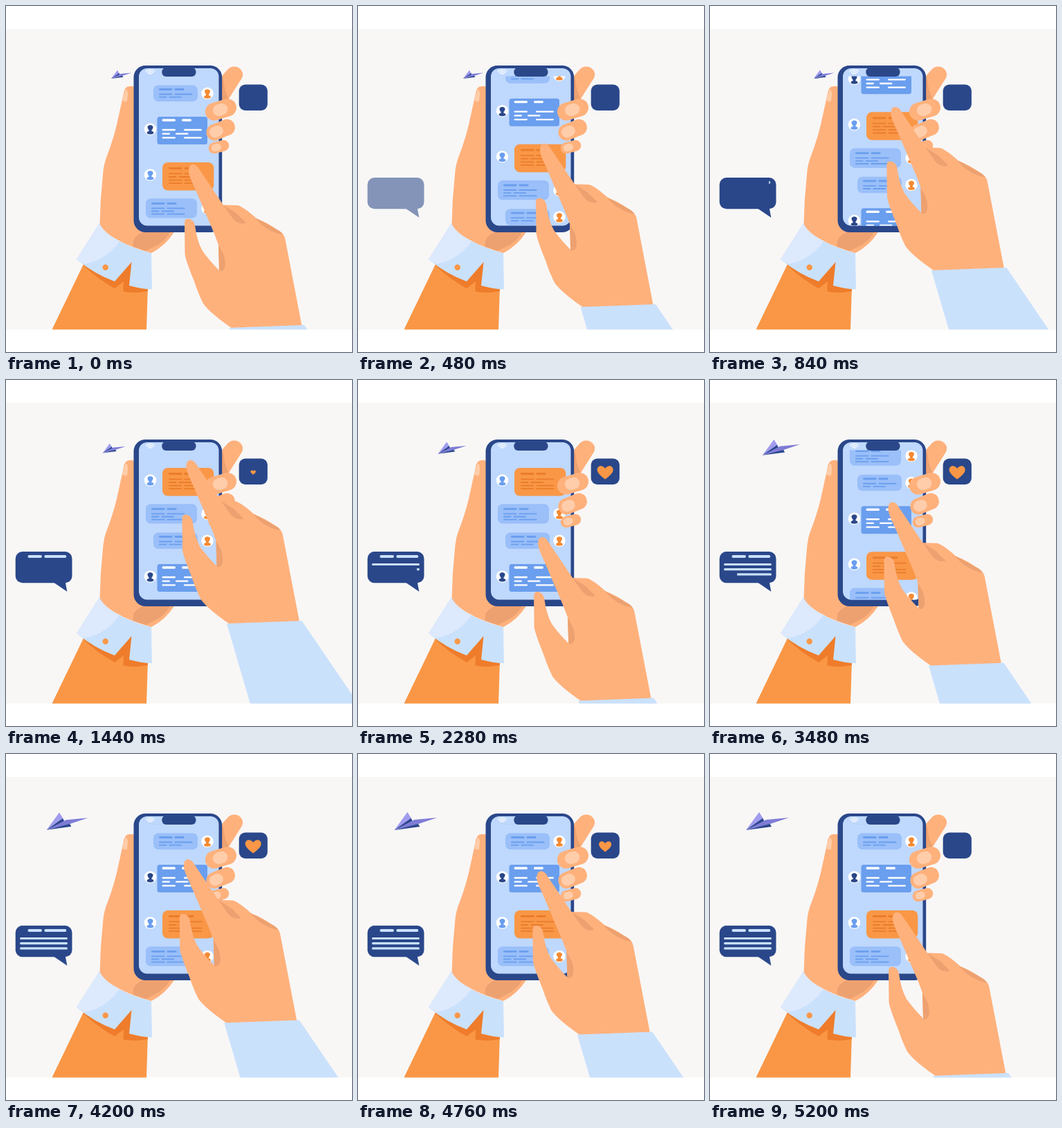
An HTML page that plays this animation: 500x500 px, repeating every 5.4 s.

```html
<!DOCTYPE html>
<html lang="en">
<head>
<meta charset="utf-8">
<title>Chatting on a phone</title>
<style>
  html, body { margin: 0; width: 100%; height: 100%; overflow: hidden; background: #fff; }
  svg { display: block; width: 100vw; height: 100vh; }
  .skin { fill: #ffb17c; }
  .shade { fill: #eda170; }
  .nail { fill: #ffcdaa; }
  .navy { fill: #2a478a; }
  .cuff { fill: #cae1fc; }
  .orange { fill: #f99746; }
  .rust { fill: #ee7c2b; }
  .line { fill: none; stroke-linecap: round; }
</style>
</head>
<body>
<svg viewBox="0 0 500 500" xmlns="http://www.w3.org/2000/svg">
  <defs>
    <clipPath id="screen"><path d="M192 101.500H307.500V305.500Q307.500 317.500 295.500 317.500H204Q192 317.500 192 305.500Z"/></clipPath>
    <clipPath id="stage"><rect y="33" width="500" height="434.500"/></clipPath>
    <path id="person" d="M-4 -4Q0 -8 4 -4Q4 0 2 1V3Q5 3 5 6Q0 9 -5 6Q-5 3 -2 3V1Q-4 0 -4 -4Z"/>
  </defs>
  <rect width="500" height="500" fill="#fff"/>
  <rect y="33" width="500" height="434.500" fill="#f8f7f6"/>

  <g id="plane">
    <path d="M0 0L19 -26L26 -15Z" fill="#a19cee"/>
    <path d="M0 0L24 -17L27 -12Z" class="navy"/>
    <path d="M0 0L34 -10L37 -5Z" class="navy"/>
    <path d="M0 0L29 -15L62 -18L35 -9Z" fill="#7f7cd6"/>
  </g>

  <g id="bubble" class="navy">
    <rect x="13.700" y="248" width="81.800" height="45.300" rx="10"/>
    <path d="M68 292L88.300 305.700L85 288Z"/>
  </g>
  <g id="typed"></g>

  <!-- holding arm -->
  <path d="M112 373L66.500 467.500H203L205 405L160 370Z" class="orange"/>
  <path d="M111 374Q133 395 157 408L170 398L169.500 412.500Q188 416 205 412V400L181 368L150 380Z" class="rust"/>
  <path d="M188 119Q183 114 175.500 116.500Q171 119 170 126L163 158Q157 188 146.500 215Q141 228 140 244Q136 280 135.500 316Q150 340 210 357Q230 347 243.500 326L200 300Z" class="skin"/>
  <path d="M184 348V338Q192 326 208 325H238Q231 340 214 348L202 354Z" class="shade"/>
  <path d="M172.500 121Q176 120 176 128L175 137.500Q171 139 167.500 136Z" class="nail"/>
  <path d="M135 314Q139 325 152 333Q177 349 210 357L211 409.500Q196 409 178 404L181.500 370L157 398Q127 387 102 366Z" class="cuff"/>
  <path d="M135 314Q140 328 164.500 339.500Q144 368 113 373L102 366Z" fill="#dde9fd"/>
  <circle cx="143.700" cy="377.800" r="4.200" class="orange"/>
  <path d="M308 106L320 92Q327 85 336 89Q345 95 341 104L322 134L310 145Z" class="skin"/>
  <path d="M311 106L314 105Q315 122 322 134L311 142Z" class="shade"/>

  <!-- phone -->
  <rect x="184.500" y="86" width="127.700" height="241" rx="17" class="navy"/>
  <rect x="192" y="90" width="115.500" height="227.500" rx="12" fill="#bfd8fd"/>
  <g clip-path="url(#screen)"><g id="list"></g></g>
  <rect x="225.300" y="89" width="49.200" height="13" rx="6" class="navy"/>
  <g id="signal"></g>
  <g id="fingers"></g>

  <rect x="336.700" y="113.500" width="41.200" height="37.500" rx="9" class="navy"/>
  <path id="heart" class="orange" d="M0 10C-5 6 -11.500 1.500 -11.500 -4C-11.500 -10 -3.500 -11.500 0 -5.500C3.500 -11.500 11.500 -10 11.500 -4C11.500 1.500 5 6 0 10Z"/>

  <!-- tapping hand -->
  <g clip-path="url(#stage)"><g id="hand">
    <path d="M264 236Q265 229 270 228.700Q275 229 278 234L314 287.500L334 288Q342 289 362 307Q378 313 392 323.500Q402 328 403.500 337L427.500 462L327 466Q295 444 285 430Q278 416 272 398Q259 366 258.500 358L258 313Q258.500 307.500 263 307.500Q271 308 273 317Q276 340 284 354Q294 368 308 382L307 345L301 329L272 261Q263 243 264 236Z" class="skin"/>
    <path d="M307 345L314.500 359Q319 374 315 381Q311 385 308 382Z" class="shade"/>
    <path d="M314 287.500L333 299.500L347 313.500Q335 317 327 306Z" class="shade"/>
    <path d="M360 306L390 322Q398 326 400 330.500Q376 326 360 306Z" class="shade"/>
    <path d="M322.500 465L431 461L567 661H380Z" class="cuff"/>
  </g></g>
</svg>
<script>
const NS = "http://www.w3.org/2000/svg";
const $ = id => document.getElementById(id);

function add(parent, tag, attrs) {
  const el = document.createElementNS(NS, tag);
  for (const k in attrs) el.setAttribute(k, attrs[k]);
  return parent.appendChild(el);
}

function dash(parent, x, y, length, width, stroke) {
  const d = `M${x + width / 2} ${y}h${length - width}`;
  return add(parent, "path", { d, class: "line", stroke, "stroke-width": width });
}

// Curled finger: a tilted capsule with a smaller one for the nail.
function finger(cx, cy, w, h, tilt, nailShift) {
  const g = add($("fingers"), "g", { transform: `translate(${cx} ${cy}) rotate(${tilt})` });
  const capsule = (x, width, height, name) =>
    add(g, "rect", { x: x - width / 2, y: -height / 2, width, height, rx: height / 2, class: name });
  capsule(0, w, h, "skin");
  capsule(nailShift * w, w * 0.47, h * 0.66, "nail");
}
finger(310.5, 149.7, 46, 25.5, -17, -0.02);
finger(310.2, 179, 43, 23.5, -22, -0.16);
finger(307.5, 203.5, 30, 16, -15, -0.13);

for (let r = 3; r <= 9; r += 3)
  add($("signal"), "path", {
    d: `M${208.5 - 0.7 * r} ${100 - 0.6 * r}a${r} ${r} 0 0 1 ${1.4 * r} 0`,
    class: "line", stroke: "#fff", "stroke-width": 1.3
  });

// A chat card: a title row, then body rows of which the second is short.
function card(parent, c) {
  const { x, y, width, height, rx, fill } = c;
  add(parent, "rect", { x, y, width, height, rx, fill });
  const pair = (dy, a, gap, b, thick) => {
    dash(parent, x + c.pad, y + dy, a, thick, c.ink);
    dash(parent, x + c.pad + a + gap, y + dy, b, thick, c.ink);
  };
  const gap = c.gap || 3;
  pair(c.title, 19.5, Math.min(gap, 9), 14, c.thick + 1);
  for (let i = 0; i < c.rows; i++) {
    const dy = c.body + i * c.step;
    if (i === 1) pair(dy, 11.5, Math.min(gap, 8), 18.5, c.thick);
    else pair(dy, 19.5, gap, 26, c.thick);
  }
  const cx = c.right ? 291 : 208.5, cy = y + Math.min(height / 2, 18);
  add(parent, "circle", { cx, cy, r: 8.7, fill: "#fff" });
  add(parent, "use", { href: "#person", fill: c.face, transform: `translate(${cx} ${cy})` });
}

const CYCLE = 205;
const BLUE = "#6a9eee", PALE = "#9abff9", ORANGE = "#f99746", NAVY = "#2a478a";
const reply = { rx: 7, fill: PALE, ink: BLUE, face: "#f58a34", right: true, pad: 8, step: 4.2, thick: 1.8 };
const cards = [
  { ...reply, x: 213, y: 114.5, width: 64, height: 23.5, title: 6, body: 13, rows: 2 },
  { x: 218.5, y: 160, width: 72.5, height: 40, rx: 3.5, fill: BLUE, ink: "#fff", face: NAVY,
    pad: 7, gap: 12, title: 5, body: 19, step: 5.7, rows: 3, thick: 2.3 },
  { x: 226, y: 226, width: 74.3, height: 40.5, rx: 8, fill: ORANGE, ink: "#ea7c2c", face: BLUE,
    pad: 9, title: 8.5, body: 16.4, step: 4.6, rows: 4, thick: 1.8 },
  { ...reply, x: 202, y: 278.3, width: 74, height: 28.3, title: 7, body: 14, rows: 3 }
];
const list = $("list");
for (const shift of [0, CYCLE]) {
  const group = add(list, "g", { transform: `translate(0 ${shift})` });
  cards.forEach(c => card(group, c));
}

// Speech bubble: four lines, each uncovered from right to left.
const STEP = 720, LEFT = 20, RIGHT = 89;
const wipes = [];
for (let i = 0; i < 4; i++) {
  const y = i ? 259.3 + 7.2 * i : 255;
  const clip = add($("typed"), "clipPath", { id: "wipe" + i });
  wipes.push(add(clip, "rect", { y: y - 4, height: 8 }));
  const line = add($("typed"), "g", { "clip-path": `url(#wipe${i})` });
  if (i) dash(line, LEFT, y, RIGHT - LEFT, 3.2, "#cae1fc");
  else {
    dash(line, 31.5, y, 20.5, 4, "#cae1fc");
    dash(line, 55.3, y, 32, 4, "#cae1fc");
  }
}

const part = (t, a, b) => Math.min(1, Math.max(0, (t - a) / (b - a)));
const ease = (t, a, b) => (1 - Math.cos(Math.PI * part(t, a, b))) / 2;
const place = (id, x, y, scale = 1) =>
  $(id).setAttribute("transform", `translate(${x} ${y}) scale(${scale})`);

function draw(t) {
  // Swipe up, drop below the start, swipe up again, return.
  const first = ease(t, 80, 1240), drop = ease(t, 1750, 2560);
  const second = ease(t, 2560, 3880), back = ease(t, 4560, 5200);
  place("hand",
    -3.5 * first - 0.5 * drop - 3.2 * second + 7.2 * back,
    -113 * first + 152 * drop - 115.5 * second + 76.5 * back);
  place("list", 0, -99 * first - (CYCLE - 99) * second);

  place("heart", 357.2, 133.6, ease(t, 1240, 1760) - ease(t, 4600, 5120));
  $("bubble").setAttribute("opacity", part(t, 80, 800));

  const fly = ease(t, 400, 4960);
  place("plane", 152 - 100 * fly, 105 + 5 * fly, 0.47 + 0.53 * fly);

  wipes.forEach((rect, i) => {
    const start = 800 + i * STEP;
    const width = (RIGHT - LEFT) * part(t, start, start + STEP);
    rect.setAttribute("x", RIGHT - width);
    rect.setAttribute("width", width);
  });
}

const LOOP = 5400, TICK = 40;
let origin = null;
function frame(now) {
  if (origin === null) origin = now;
  const t = Math.max(0, now - origin) % LOOP;
  draw(t < 120 ? 0 : Math.min(5200, Math.floor(t / TICK) * TICK));
  requestAnimationFrame(frame);
}
draw(0);
requestAnimationFrame(frame);
</script>
</body>
</html>
```
